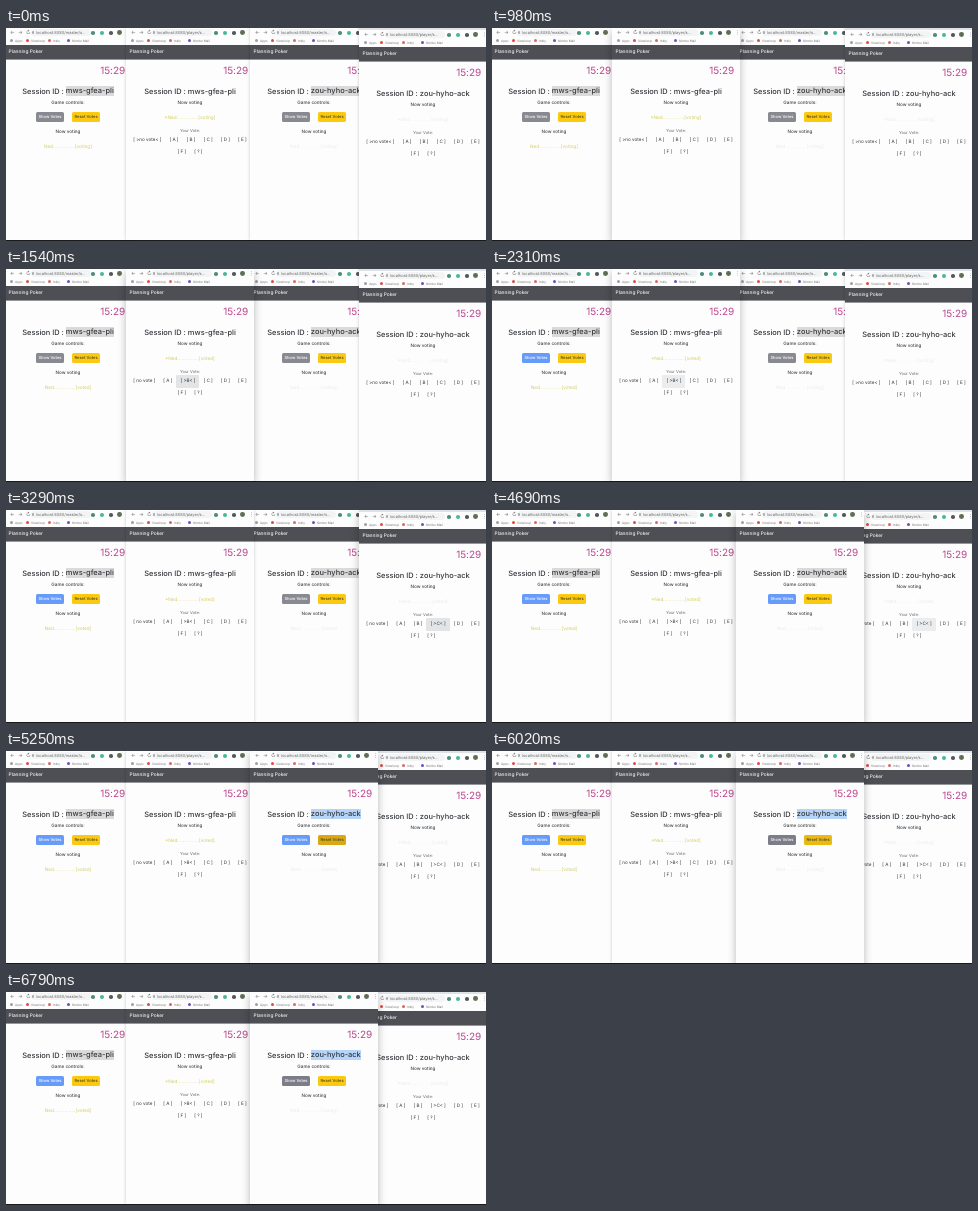
These frames come from a looping animation (480x213 px, 8000 ms). An HTML page:

```html
<!DOCTYPE html>
<html lang="en">
<head>
<meta charset="utf-8">
<title>Planning Poker</title>
<style>
html, body { margin: 0; width: 100%; height: 100%; overflow: hidden; background: #1c1c1e; }
body { position: relative; font-family: Inter, "Liberation Sans", sans-serif; color: #3d4045; text-rendering: geometricPrecision; }
body * { box-sizing: border-box; white-space: pre; }

.win { position: absolute; top: 0; width: 128px; height: 212px; background: #dee1e6; --front: 0 3px 8px rgba(0,0,0,.28); --back: 0 0 3px rgba(0,0,0,.22); box-shadow: var(--back); }
.page { position: absolute; left: 0; right: 0; bottom: 0; background: #fdfdfd; }
.nav { position: absolute; left: 0; right: 0; top: 17px; height: 15px; background: #4d4f55; border-bottom: 1px solid #96979b; }
.t { position: absolute; line-height: 0; }
.mid { left: 0; width: 100%; text-align: center; }
.brand { left: 3.6px; font-size: 4.8px; font-weight: 500; color: #f4f4f5; }
.clock { right: 6px; font-size: 10px; color: #bd4790; letter-spacing: -.1px; }
.head { font-size: 7.45px; font-weight: 500; color: #33363b; }
.sub { font-size: 4.6px; font-weight: 500; }
.tiny { font-size: 4.1px; color: #666; }
.name { font-size: 4.7px; }
.url { font-size: 4px; color: #666; }
.mark { font-size: 3.2px; color: #777; }
.pill { position: absolute; left: 26px; top: 1px; width: 60px; height: 7px; border-radius: 4px; background: #f3f4f5; }
.tools { position: absolute; right: 0; top: 0; width: 128px; }
.dot { position: absolute; border-radius: 50%; }
.sel { background: #dadada; padding: .4px 0; }
.btn { position: absolute; top: 84px; width: 28px; height: 9.5px; border-radius: 1.6px; font-size: 4.1px; font-weight: 500; line-height: 9.5px; text-align: center; }
.show { left: calc(50% - 32px); color: #fff; background: #898992; }
.reset { left: calc(50% + 4px); color: #4d431f; background: #fbca10; }
.row { position: absolute; left: -10px; right: -10px; height: 13px; display: flex; justify-content: center; font-size: 4.6px; line-height: 13px; color: #2b2e33; }
.row span { padding: 0 4px; border-radius: 1px; }

.step { animation: 8s step-end infinite; }
.fade { animation: 8s linear infinite; }

#w1 { z-index: 1; width: 126px; }
#w2 { z-index: 2; animation-name: raise2; }
#w3 { z-index: 3; animation-name: raise3; }
#w4 { z-index: 4; animation-name: raise4; }
@keyframes raise2 { 0% { z-index: 2; box-shadow: var(--back); } 12.2% { z-index: 5; box-shadow: var(--front); } 35.8%, 100% { z-index: 5; box-shadow: var(--back); } }
@keyframes raise3 { 0% { z-index: 3; box-shadow: var(--back); } 56.8%, 100% { z-index: 6; box-shadow: var(--front); } }
@keyframes raise4 { 0% { box-shadow: var(--back); } 35.8% { box-shadow: var(--front); } 56.8%, 100% { box-shadow: var(--back); } }

/* first room votes at 1.54 s, second at 3.29 s and is reset at 5.39 s */
.r1.before { animation-name: before1; }
.r1.after { animation-name: after1; }
.r2.before { animation-name: before2; }
.r2.after { animation-name: after2; }
.r2.name.before { animation-name: waiting2; }
.r2.name.after { animation-name: voted2; }
@keyframes before1 { 0% { opacity: 1; } 19.2%, 100% { opacity: 0; } }
@keyframes after1 { 0% { opacity: 0; } 19.2%, 100% { opacity: 1; } }
@keyframes before2 { 0% { opacity: 1; } 41.1%, 100% { opacity: 0; } }
@keyframes after2 { 0% { opacity: 0; } 41.1%, 100% { opacity: 1; } }
@keyframes waiting2 { 0% { opacity: 1; } 41.1% { opacity: 0; } 67.3%, 100% { opacity: 1; } }
@keyframes voted2 { 0% { opacity: 0; } 41.1% { opacity: 1; } 67.3%, 100% { opacity: 0; } }

/* hovered, pressed, hovered, left */
.r1 .pick { animation-name: pickB; }
.r2 .pick { animation-name: pickC; }
@keyframes pickB { 0% { background: none; } 17.4% { background: #ebecee; } 19.2% { background: #e3e4e6; } 21% { background: #ebecee; } 35.8%, 100% { background: none; } }
@keyframes pickC { 0% { background: none; } 39.3% { background: #ebecee; } 41.1% { background: #e3e4e6; } 42.9% { background: #ebecee; } 59.2%, 100% { background: none; } }

#w1 .show { animation-name: show1; }
#w3 .show { animation-name: show2; }
#w3 .reset { animation-name: reset2; }
#w3 .sel { animation-name: focus; }
@keyframes show1 { 0%, 19.3% { background: #898992; } 21.8%, 100% { background: #679bf9; } }
@keyframes show2 { 0%, 41.2% { background: #898992; } 43%, 67.2% { background: #679bf9; } 68.4%, 100% { background: #7d7d88; } }
@keyframes reset2 { 0%, 64.6% { background: #fbca10; } 65.6%, 74.2% { background: #d9a812; } 76.2%, 100% { background: #fbca10; } }
@keyframes focus { 0% { background: #dadada; } 59.2%, 100% { background: #b6d4f8; } }
</style>
</head>
<body>
<script>
const text = (cls, y, body, css = '') => `<div class="t ${cls}" style="top:${y}px;${css}">${body}</div>`;
const dot = (x, y, size, color) =>
  `<i class="dot" style="left:${x}px;top:${y}px;width:${size}px;height:${size}px;background:${color}"></i>`;

function chrome(path) {
  const arrows = ['←', '→', '↻'].map((c, i) => text('url', 4.5, c, `left:${5 + i * 8}px;font-size:5px`)).join('');
  const marks = [['Apps', 10, '#9aa0a6'], ['Viewloop', 26, '#e2483d'], ['Inkly', 48, '#d9685e'], ['Nimbo Mail', 67, '#6b4fc0']]
    .map(([label, x, color]) => dot(x - 5, 11, 3, color) + text('mark', 12.6, label, `left:${x}px`)).join('');
  const tools = dot(88, 3, 3.6, '#4f8f78') + dot(97, 2.5, 4.4, '#45b894') +
    dot(106, 3, 3.6, '#55585c') + dot(114, 2.3, 4.8, '#5f6f52') +
    text('url', 4.5, '⋮', 'left:123px;font-size:5px');
  return `<div class="pill"></div>${arrows}${dot(27, 3.4, 2.2, '#aaa')}` +
    text('url', 4.6, `localhost:8080/${path}…`, 'left:31px') + `<div class="tools">${tools}</div>` + marks;
}

function row(y, cls, choices, chosen, target) {
  const cells = choices.map(c =>
    `<span class="${c === target ? 'pick step' : ''}">[ ${c === chosen ? `&gt;${c}&lt;` : c} ]</span>`);
  return `<div class="row step ${cls}" style="top:${y}px">${cells.join('')}</div>`;
}

function player(y, room, star, color) {
  const label = (when, state) => text(`mid name step r${room} ${when}`, y,
    `${star}Ned${'.'.repeat(16)}[${state}]`, `color:${color}`);
  return label('before', 'voting') + label('after', 'voted');
}

function addWindow(n, x, dy, room, session, master) {
  const color = room === 1 ? '#d2cd61' : '#eaeae6';
  const id = master ? `<span class="sel step">${session}</span>` : session;
  let page = chrome(master ? 'master/s' : 'player/s') + '<div class="nav"></div>' +
    text('brand', 24, 'Planning Poker') + text('clock', 43, '15:29') +
    text('mid head', 63.7, `Session ID : ${id}`);
  if (master) {
    page += text('mid sub', 75.5, 'Game controls:') +
      '<div class="btn show fade">Show Votes</div><div class="btn reset fade">Reset Votes</div>' +
      text('mid sub', 104.8, 'Now voting') + player(119, room, '', color);
  } else {
    const target = room === 1 ? 'B' : 'C';
    const cards = ['no vote', 'A', 'B', 'C', 'D', 'E'];
    page += text('mid sub', 75.5, 'Now voting') + player(89.7, room, '*', color) +
      text('mid tiny', 103.3, 'Your Vote:') +
      row(106, `r${room} before`, cards, 'no vote', target) +
      row(106, `r${room} after`, cards, target, target) +
      row(118, '', ['F', '?']);
  }
  document.body.insertAdjacentHTML('beforeend',
    `<div class="win step" id="w${n}" style="left:${x}px"><div class="page" style="top:${dy}px">${page}</div></div>`);
}

addWindow(1, -1, 0, 1, 'mws-gfea-pli', true);
addWindow(2, 120, 0, 1, 'mws-gfea-pli', false);
addWindow(3, 244, 0, 2, 'zou-hyho-ack', true);
addWindow(4, 353, 2, 2, 'zou-hyho-ack', false);
</script>
</body>
</html>
```
